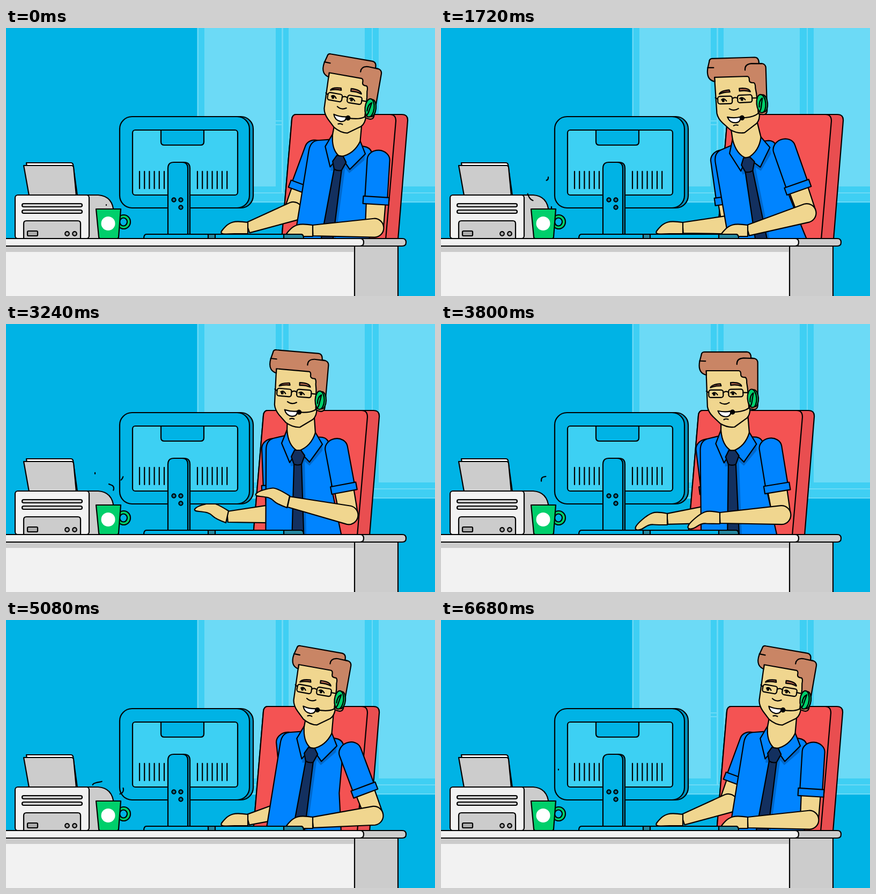
Animation, 800 px wide and 499 px high, one loop 6720 ms. Source, as an HTML page:

```html
<!DOCTYPE html>
<html lang="en">
<head>
<meta charset="utf-8">
<title>Office support desk</title>
<style>
html,body{margin:0;width:100%;height:100%;overflow:hidden;background:#00b3e5}
svg{display:block;width:100vw;height:100vh}
.ink{stroke:#000;stroke-width:2.2;stroke-linejoin:round;stroke-linecap:round}
.line{fill:none}
.skin{fill:#f0d68f}
.shirt{fill:#0084ff}
.shade{fill:#0068cc;stroke:none}
.grey{fill:#ccc}
.pale{fill:#f2f2f2}
.wall{fill:#00b3e5}
.deep{fill:#0095c2}
.teal{fill:#2588a0}
.hair{fill:#c98565}
.green{fill:#00cf6b}
.flat{stroke:none}
</style>
</head>
<body>
<svg viewBox="0 0 800 499" preserveAspectRatio="none">
  <rect class="wall" width="800" height="499"/>
  <g id="window">
    <path fill="#6cdaf6" d="M356.500 -5H805V325H356.500Z"/>
    <path fill="#3fcff3" d="M359 -5H805V323H359Z"/>
    <path fill="#6cdaf6" d="M370 -5H503V295H370ZM527 -5H669V295H527ZM695 -5H805V295H695ZM514 -5h3V307h-3ZM682 -5h2V307h-2ZM370 306H805v2H370ZM503 172h12v2h-12ZM503 179h12v2h-12Z"/>
  </g>

  <g class="ink">
    <g id="chair">
      <path fill="#e94e50" d="M541 161H738Q750 161 749 173L731 394H514L533 170Q534 161 541 161Z"/>
      <path fill="#f45353" d="M541 161H716Q727 161 727 173L708 394H514L533 170Q534 161 541 161Z"/>
    </g>

    <g id="farArm"></g>

    <g id="torso">
      <path class="shirt" d="M524 207L498 213Q485 217 485 235L484 480H645L625 391L608 310L602 222Q600 213 590 211Z"/>
      <path class="skin" d="M525 165L524 200Q527 232 545 238Q570 232 577 204L574 160Z"/>
      <path class="shade" d="M530 258L539 247L558 247L566 257L590 226L590 236L566 264L557 256L562 480H550L545 262L531 265Z"/>
      <path class="shirt" d="M524 197L514 222L529 258L543 236Q526 226 524 197Z"/>
      <path class="shirt" d="M577 202L590 224L566 257L546 236Q569 228 577 202Z"/>
      <path fill="#13305f" d="M537 261H551L558 480H531Z"/>
      <path fill="#13305f" d="M538 235H550L557 245L551 261Q544 264 537 261L532 247Z"/>
    </g>

    <g id="head">
      <path class="skin" d="M510 86L508 154Q509 164 517 173L530 187Q543 196 556 195L580 180Q587 174 587 160L592 90Z"/>
      <path class="hair" d="M510 87L571 91Q575 92 574 99Q574 104 582 104Q585 106 584 114L585 125V162Q602 170 602 155L607 78Q607 72 601 70L595 69Q596 58 588 57L510 52Q504 51 503 57L499 69Q496 81 500 88Q503 93 510 95Z"/>
      <path class="line" d="M499 68L510 69M568 79Q568 68 581 68L600 70"/>
      <path fill="#b0664a" d="M516 119Q518 113 535 113L536 117Q524 116 516 119ZM554 112Q572 112 574 120Q565 116 554 117Z"/>
      <g class="line">
        <rect x="512" y="124" width="27" height="14" rx="4" transform="rotate(4 525 131)"/>
        <rect x="549" y="125" width="27" height="14" rx="4" transform="rotate(3 562 132)"/>
        <path d="M539 130Q544 126 549 130M512 128L508 125M576 132L587 133M519 130Q524 126 528 133M553 131Q558 127 563 134M532 148Q540 154 549 149M537 180Q541 178 545 180"/>
      </g>
      <circle cx="522" cy="132" r="2.6" class="flat"/>
      <circle cx="557" cy="133" r="2.6" class="flat"/>
      <path id="smile" fill="#fff" d="M527 163Q540 167 551 165Q551 175 541 175Q530 174 527 163Z"/>
      <ellipse id="talk" fill="#5b2a1c" cx="540" cy="168" rx="5" ry="4"/>
      <ellipse class="green" cx="596" cy="144" rx="8" ry="16"/>
      <ellipse class="green" cx="592" cy="144" rx="8.5" ry="17"/>
      <path class="line" d="M554 167Q587 169 591 152L595 134Q588 138 588 150"/>
      <circle cx="554" cy="167" r="3.6"/>
    </g>

    <g id="nearArm"></g>

    <g id="monitor">
      <rect class="deep" x="230" y="165" width="231" height="170" rx="23"/>
      <rect class="wall" x="212" y="165" width="242" height="170" rx="23"/>
      <rect fill="#3dd0f3" x="236" y="190" width="196" height="121" rx="5"/>
      <path class="wall" d="M289 190H369V212Q369 218 363 218H295Q289 218 289 212Z"/>
      <path id="vents" class="line"/>
      <path class="deep" d="M315 250H332Q343 250 343 261V390H315Z"/>
      <path class="wall" d="M302 390V261Q302 250 313 250H328Q339 250 339 261V390Z"/>
      <g fill="#007397"><circle cx="313" cy="320" r="3.6"/><circle cx="326" cy="320" r="3.6"/><circle cx="326" cy="334" r="3.6"/></g>
      <path class="wall" d="M262 384H550Q555 384 555 392H257Q257 384 262 384Z"/>
      <path class="teal" d="M377 384H390V392H377Z"/>
      <path class="teal" d="M518 384H550Q555 384 555 392H518Z"/>
    </g>

    <g id="printer">
      <path fill="#fff" d="M38 251H121Q124 251 125 254L133 312H46Z"/>
      <path class="grey" d="M33 256H122Q125 256 126 259L131 312H43Z"/>
      <path class="grey" d="M140 311H172Q200 313 201 345V392H140Z"/>
      <rect class="pale" x="17" y="311" width="138" height="81" rx="5"/>
      <rect class="grey" x="30" y="327" width="112" height="6" rx="3"/>
      <rect class="grey" x="30" y="339" width="112" height="6" rx="3"/>
      <path class="grey" d="M33 392V364Q33 359 38 359H134Q139 359 139 364V392Z"/>
      <rect x="40" y="378" width="19" height="9" rx="2" fill="#aaa"/>
      <g fill="#aaa"><circle cx="114" cy="383" r="3.8"/><circle cx="128" cy="383" r="3.8"/></g>
    </g>

    <g id="steam" class="line"></g>

    <g id="cup">
      <path class="green" fill-rule="evenodd" d="M207 361a12.5 13 0 1 1 25 0a12.5 13 0 1 1 -25 0ZM212 361a7 7.5 0 1 0 14 0a7 7.5 0 1 0 -14 0Z"/>
      <path class="green" d="M168 337H214L210 389Q210 392 207 392H176Q173 392 173 389Z"/>
      <circle class="flat" cx="190.500" cy="364" r="13" fill="#fff"/>
    </g>

    <g id="desk">
      <path class="grey" d="M640 400H731V510H640Z"/>
      <path class="pale" d="M-5 400H650V510H-5Z"/>
      <path class="grey flat" d="M-5 407H649V417H-5Z"/>
      <path class="grey" d="M-5 392H739Q746 392 746 399Q746 406 739 406H-5Z"/>
      <path class="pale" d="M-5 392H660Q667 392 667 399Q667 406 660 406H-5Z"/>
    </g>

    <path id="bubble" fill="#fff" d="M274 58H341Q349 58 349 66V109Q349 118 341 118H274Q268 117 266 114Q256 118 241 118Q258 112 266 101V66Q266 58 274 58Z"/>
  </g>
</svg>
<script>
const LOOP = 6720;
const $ = id => document.getElementById(id);
const mix = (a, b, k) => a + (b - a) * k;
const smooth = k => k * k * (3 - 2 * k);

// Each row is a time followed by the values reached at that time.
function track(rows, t) {
  const i = rows.findIndex(row => row[0] > t);
  if (i === 0) return rows[0].slice(1);
  if (i < 0) return rows[rows.length - 1].slice(1);
  const a = rows[i - 1], b = rows[i];
  const k = smooth((t - a[0]) / (b[0] - a[0]));
  return a.slice(1).map((v, j) => mix(v, b[j + 1], k));
}

// The chair, the torso and the hands share the times of the two rolls.
const LEAN = [80, 760], ROLL_IN = [1860, 2950], SIT_BACK = [4380, 5080], ROLL_OUT = [5220, 6220];

const chairKeys = [
  [LEAN[0], 0], [LEAN[1], 1], [ROLL_IN[0], 1], [ROLL_IN[1], -53],
  [ROLL_OUT[0], -53], [ROLL_OUT[1], 0]
];

// knot x, y, angle; x is relative to the chair
const torsoSit = [621, 250, 9], torsoSpeak = [571, 253, -10], torsoWork = [597, 247, 0];
const torsoKeys = [
  [LEAN[0], ...torsoSit], [LEAN[1], ...torsoSpeak],
  [ROLL_IN[0], ...torsoSpeak], [ROLL_IN[1], ...torsoWork],
  [3500, ...torsoWork], [4280, 593, 248, -2.5],
  [SIT_BACK[0], 593, 248, -2.5], [SIT_BACK[1], ...torsoSit]
];

// ear x, y, angle; x is relative to the chair
const headSit = [680, 149, 6.2], headSpeak = [592, 140, -12.2], headWork = [640, 142, 1.2];
const headTilt = [625, 131, -13.8];
const headKeys = [
  [LEAN[0], ...headSit], [LEAN[1], ...headSpeak], [1400, ...headSpeak],
  [2000, 603, 141, 0], [2740, 633, 141, .3], [3100, ...headWork],
  [3500, ...headWork], [4280, ...headTilt],
  [SIT_BACK[0], ...headTilt], [SIT_BACK[1], 676, 149, 6.4],
  [5600, 676, 149, 6.4], [5960, 678, 146, 6.3], [6300, ...headSit]
];

// near wrist x, y, far wrist x, y, raised amount, typing amount
const resting = [572, 377, 451, 372, 0, 0];
const typing = [520, 361, 422, 363, 0, 1];
const handKeys = [
  [ROLL_IN[0], ...resting], [2400, 515, 375, 430, 370, 0, 0],
  [3200, 527, 331, 413, 359, 1, 0], [3280, 527, 331, 413, 359, 1, 0],
  [3700, ...typing], [SIT_BACK[0], ...typing], [SIT_BACK[1], ...resting]
];
const bubbleKeys = [
  [400, 0], [640, 1.4], [800, 1], [1220, 1], [1300, 1.2], [1400, 0]
];

const handRest = [[0,-10],[-20,-13],[-36,-8],[-46,2],[-51,9],[-46,12],[-34,11],[-16,11],[0,11]];
const handRaised = [[2,-11],[-22,-26],[-37,-25],[-57,-19],[-64,-11],[-42,-9],[-32,-6],[-22,4],[-3,11]];
const handTyping = [[0,-10],[-20,-14],[-36,-8],[-57,10],[-61,20],[-50,21],[-34,10],[-18,11],[0,11]];

function turn([x, y], degrees) {
  const r = degrees * Math.PI / 180, c = Math.cos(r), s = Math.sin(r);
  return [x * c - y * s, x * s + y * c];
}
const shift = ([x, y], [dx, dy]) => [x + dx, y + dy];

function elbowOf(s, w, upper, lower) {
  const dx = w[0] - s[0], dy = w[1] - s[1];
  const d = Math.min(Math.hypot(dx, dy), upper + lower);
  const a = (upper * upper - lower * lower + d * d) / (2 * d);
  const h = Math.sqrt(Math.max(0, upper * upper - a * a));
  return [s[0] + (dx * a + dy * h) / d, s[1] + (dy * a - dx * h) / d];
}

// Maps (along, across) coordinates of the bone a-b to the stage.
function bone(a, b) {
  const len = Math.hypot(b[0] - a[0], b[1] - a[1]);
  const ux = (b[0] - a[0]) / len, uy = (b[1] - a[1]) / len;
  const at = (p, q) => (a[0] + ux * p - uy * q).toFixed(2) + ' ' + (a[1] + uy * p + ux * q).toFixed(2);
  return { len, at, angle: Math.atan2(uy, ux) * 180 / Math.PI };
}

function handPath(wrist, raised, typed) {
  const pts = handRest.map((p, i) => p.map((v, j) =>
    wrist[j] + v + (handRaised[i][j] - v) * raised + (handTyping[i][j] - v) * typed));
  let d = 'M' + pts[0];
  for (let i = 1; i < pts.length - 1; i++) {
    const last = i === pts.length - 2, q = pts[i + 1];
    const end = last ? q : [(pts[i][0] + q[0]) / 2, (pts[i][1] + q[1]) / 2];
    d += 'Q' + pts[i] + ' ' + end;
  }
  return d + 'Z';
}

function makeArm(group) {
  const parts = ['skin', 'shirt', 'shirt', 'skin', 'skin'].map(name => {
    const p = document.createElementNS('http://www.w3.org/2000/svg', 'path');
    p.setAttribute('class', name);
    group.append(p);
    return p;
  });
  return (shoulder, wrist, lower, upper, raised, typed) => {
    const elbow = elbowOf(shoulder, wrist, upper, lower);
    const u = bone(shoulder, elbow), f = bone(elbow, wrist);
    const poly = list => 'M' + list.map(p => u.at(...p)).join('L') + 'Z';
    [
      poly([[80, 18], [u.len, 17], [u.len, -17], [80, -18]]),
      `M${u.at(70, 21)}L${u.at(0, 21)}A18 21 ${u.angle} 0 1 ${u.at(0, -21)}L${u.at(70, -21)}Z`,
      poly([[69, 24], [69, -24], [83, -24], [83, 24]]),
      `M${f.at(f.len, 10)}L${f.at(0, 17.5)}A17.5 17.5 0 0 1 ${f.at(0, -17.5)}L${f.at(f.len, -10)}Z`,
      handPath(wrist, raised, typed)
    ].forEach((d, i) => parts[i].setAttribute('d', d));
  };
}
const drawFar = makeArm($('farArm')), drawNear = makeArm($('nearArm'));

const wisps = [
  { d: 'M180 338V332C180 318 170 325 165 316S160 305 168 303S183 302 178 296S166 293 166 286V276', runs: [[960, 3290], [3820, 6150]] },
  { d: 'M187 330V322C187 312 201 316 201 306S187 302 187 291S200 288 200 279V270', runs: [[0, 2000], [2380, 4370]] },
  { d: 'M206 339V331C206 322 219 326 219 316S206 311 206 303S212 293 215 290S219 284 219 277', runs: [[1620, 3500], [4330, 6700]] }
].map(w => {
  const el = document.createElementNS('http://www.w3.org/2000/svg', 'path');
  el.setAttribute('d', w.d);
  el.setAttribute('pathLength', 100);
  $('steam').append(el);
  return { el, runs: w.runs };
});

const vent = x => `M${x.toFixed(1)} 267V299`;
$('vents').setAttribute('d',
  [...Array(6)].map((_, i) => vent(249 + i * 9.2)).join('') +
  [...Array(7)].map((_, i) => vent(357 + i * 9.2)).join(''));

function place(id, [x, y], angle, [ox, oy]) {
  $(id).setAttribute('transform', `translate(${x} ${y}) rotate(${angle}) translate(${-ox} ${-oy})`);
}

function draw(t) {
  const [slide] = track(chairKeys, t);
  $('chair').setAttribute('transform', `translate(${slide} 0)`);

  const [kx, ky, lean] = track(torsoKeys, t);
  const [ex, ey, tilt] = track(headKeys, t);
  const knot = [kx + slide, ky];
  place('torso', knot, lean, [544, 247]);
  place('head', [ex + slide, ey], tilt, [594, 144]);

  const [nx, ny, fx, fy, raised, typed] = track(handKeys, t);
  drawFar(shift(turn([-46, -16], lean), knot), [fx, fy], 90, 122, raised, typed);
  drawNear(shift(turn([72, -16], lean), knot), [nx, ny], 115, 127, raised, typed);

  const talking = t > 480 && t < 1400;
  $('smile').style.display = talking ? 'none' : '';
  $('talk').style.display = talking ? '' : 'none';
  $('talk').setAttribute('ry', 2.5 + 2.2 * Math.abs(Math.sin(t / 90)));

  const [size] = track(bubbleKeys, t);
  $('bubble').style.display = size > .01 ? '' : 'none';
  $('bubble').setAttribute('transform', `translate(241 118) scale(${size}) translate(-241 -118)`);

  for (const { el, runs } of wisps) {
    const run = runs.find(([from, to]) => t > from && t < to);
    el.style.display = run ? '' : 'none';
    if (!run) continue;
    const p = (t - run[0]) / (run[1] - run[0]);
    const len = 1 + 20 * Math.sin(Math.PI * p);
    const start = Math.max(0, Math.min(99 - len, p * 100 - len / 2));
    el.setAttribute('stroke-dasharray', `${len} 300`);
    el.setAttribute('stroke-dashoffset', -start);
  }
}

const began = performance.now();
function tick() {
  draw((performance.now() - began) % LOOP);
  requestAnimationFrame(tick);
}
tick();
</script>
</body>
</html>
```
